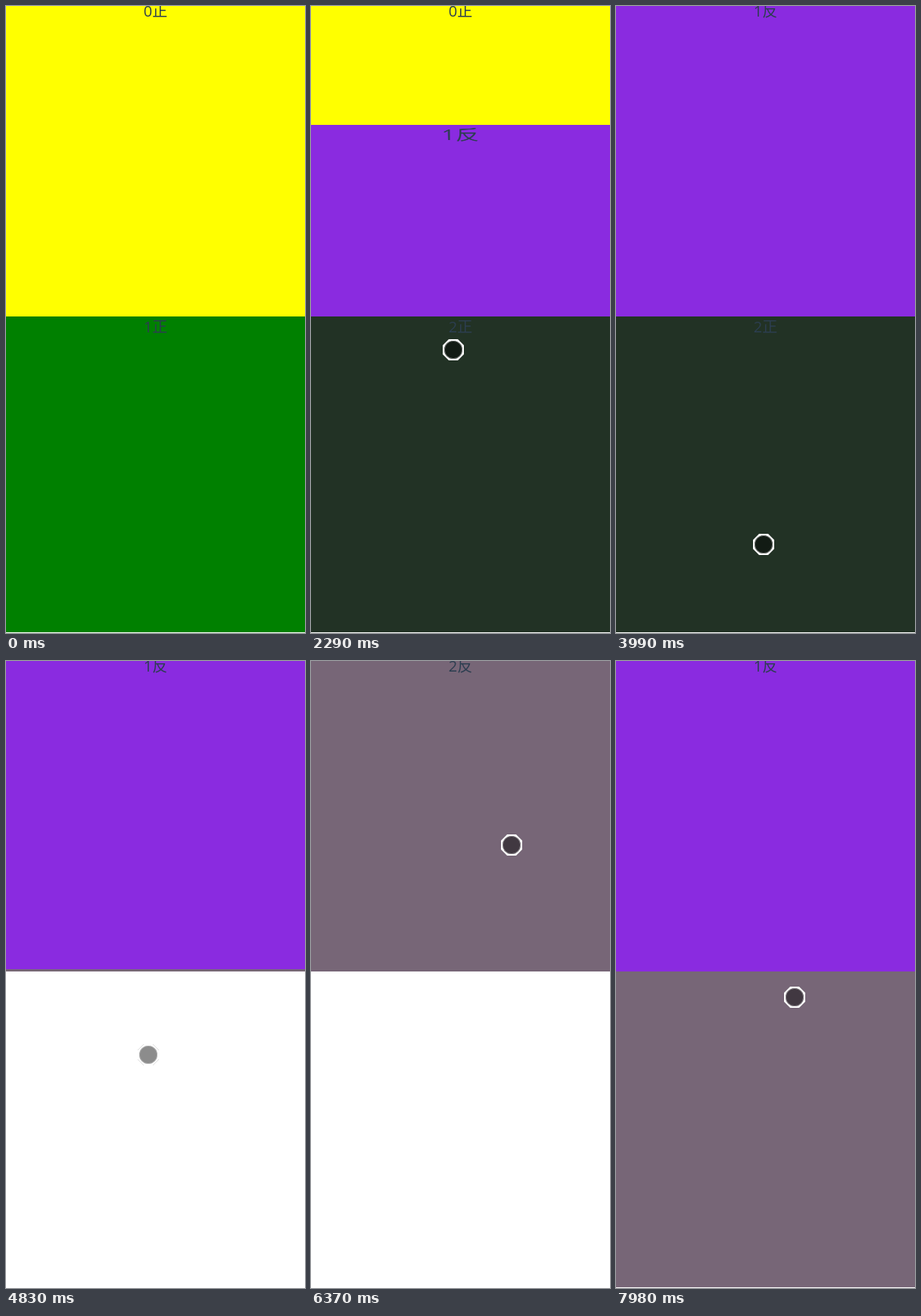
An HTML page that plays this animation: 395x828 px, repeating every 8 s.

```html
<!DOCTYPE html>
<html lang="zh-CN">
<head>
<meta charset="utf-8">
<title>Flip pages</title>
<style>
html, body { margin: 0; width: 100%; height: 100%; overflow: hidden; background: #fff; }
#stage { position: relative; width: 395px; height: 827px; overflow: hidden; }
.page {
  position: absolute; left: 0; width: 395px; height: 417px;
  font: 20px/28.4px "Open Sans", "Noto Sans CJK SC", "Noto Sans CJK", sans-serif;
  color: #2c3e50; text-align: center;
}
.upper { top: -7px; transform-origin: 50% 100%; }
.lower { top: 410px; transform-origin: 50% 0; }
#touch { position: absolute; left: 0; top: 0; overflow: hidden; }
</style>
</head>
<body>
<div id="stage">
  <div class="page upper" style="background:#ff0">0正</div>
  <div class="page lower" id="front2" style="background:#223225">2正</div>
  <div class="page lower" id="front1" style="background:#008000">1正</div>
  <div class="page upper" id="back1" style="background:#8a2be0">1反</div>
  <div class="page upper" id="back2" style="background:#776677">2反</div>
  <svg id="touch" width="28" height="28" viewBox="-14 -14 28 28">
    <path d="M-6-14H6L14-6V6L6 14H-6L-14 6V-6Z M-12 0a12 12 0 1 0 24 0a12 12 0 1 0-24 0Z"
      fill="#fff" fill-rule="evenodd"/>
    <path d="M-6-14L-14-6M6-14L14-6M-6 14L-14 6M6 14L14 6" stroke="#777" stroke-opacity=".4" stroke-width=".6"/>
    <circle r="12" fill="#000" fill-opacity=".45"/>
    <circle r="11.6" fill="none" stroke="#ccc" stroke-opacity=".5"/>
  </svg>
</div>
<script>
const LOOP = 8000, STEP = 76.92, LEAD = 28;
const DEG_PER_PX = 0.48, SETTLE = 12.5;
const $ = id => document.getElementById(id);

const linear = u => u;
const easeIn = u => u ** 1.3;
const easeOut = u => 1 - (1 - u) ** 3;
const smooth = u => u * u * (3 - 2 * u);

// Strokes of the finger, timed in steps; a bow bends the way sideways.
const first = { x: 346, y: 589 };
const strokes = [
  { begin: 1, end: 7, x: 198, y: 687, bowY: 130 },
  { begin: 8, end: 16, x: 190, y: 555 },
  { begin: 16, end: 30, x: 188, y: 454, ease: easeOut },
  { begin: 30, end: 41, x: 238, y: 238 },
  { begin: 41, end: 52, x: 195, y: 711, ease: smooth },
  { begin: 54, end: 63, x: 188, y: 520 },
  { begin: 63, end: 70, x: 188, y: 480 },
  { begin: 72, end: 83, x: 265, y: 243, bowX: 68, bowY: 115 },
  { begin: 83, end: 87, x: 243, y: 133 },
  { begin: 88, end: 104, x: 236, y: 444, ease: easeIn }
];

function finger(k) {
  let { x, y } = first;
  for (const { begin, end, x: toX, y: toY, ease = linear, bowX = 0, bowY = 0 } of strokes) {
    if (k <= begin) break;
    const u = Math.min(1, (k - begin) / (end - begin));
    const bow = Math.sin(Math.PI * u);
    x += (toX - x) * ease(u) + bowX * bow;
    y += (toY - y) * ease(u) + bowY * bow;
  }
  return { x: Math.round(x), y: Math.round(y) };
}

const clamp = angle => Math.max(0, Math.min(180, angle));

function angle1(k, y) {
  if (k < 8) return 0;
  return k > 41 ? 180 : clamp(DEG_PER_PX * (687 - y));
}

// Let go past the middle, the second sheet falls over; later it is pulled down.
function angle2(k, y) {
  if (k < 54) return 0;
  if (k >= 88) return clamp(180 - DEG_PER_PX * (y - 136));
  return clamp(DEG_PER_PX * (708 - y) + SETTLE * Math.max(0, k - 64));
}

function tilt(page, shown, angle) {
  page.style.visibility = shown ? 'visible' : 'hidden';
  page.style.transform = angle ? `perspective(1000px) rotateX(${angle}deg)` : 'none';
}

function turnSheet(n, angle, keepBack) {
  const back = keepBack || angle > 90;
  tilt($('front' + n), !back, angle);
  tilt($('back' + n), back, angle - 180);
}

function draw(time) {
  const k = Math.floor((time % LOOP + LEAD) / STEP);
  const { x, y } = finger(k);
  turnSheet(1, angle1(k, y), false);
  turnSheet(2, angle2(k, y), k >= 88);
  $('touch').style.visibility = k < 1 ? 'hidden' : 'visible';
  $('touch').style.transform = `translate(${x - 14}px, ${y - 14}px)`;
}

const start = performance.now();
function loop() {
  draw(performance.now() - start);
  requestAnimationFrame(loop);
}
loop();
</script>
</body>
</html>
```
